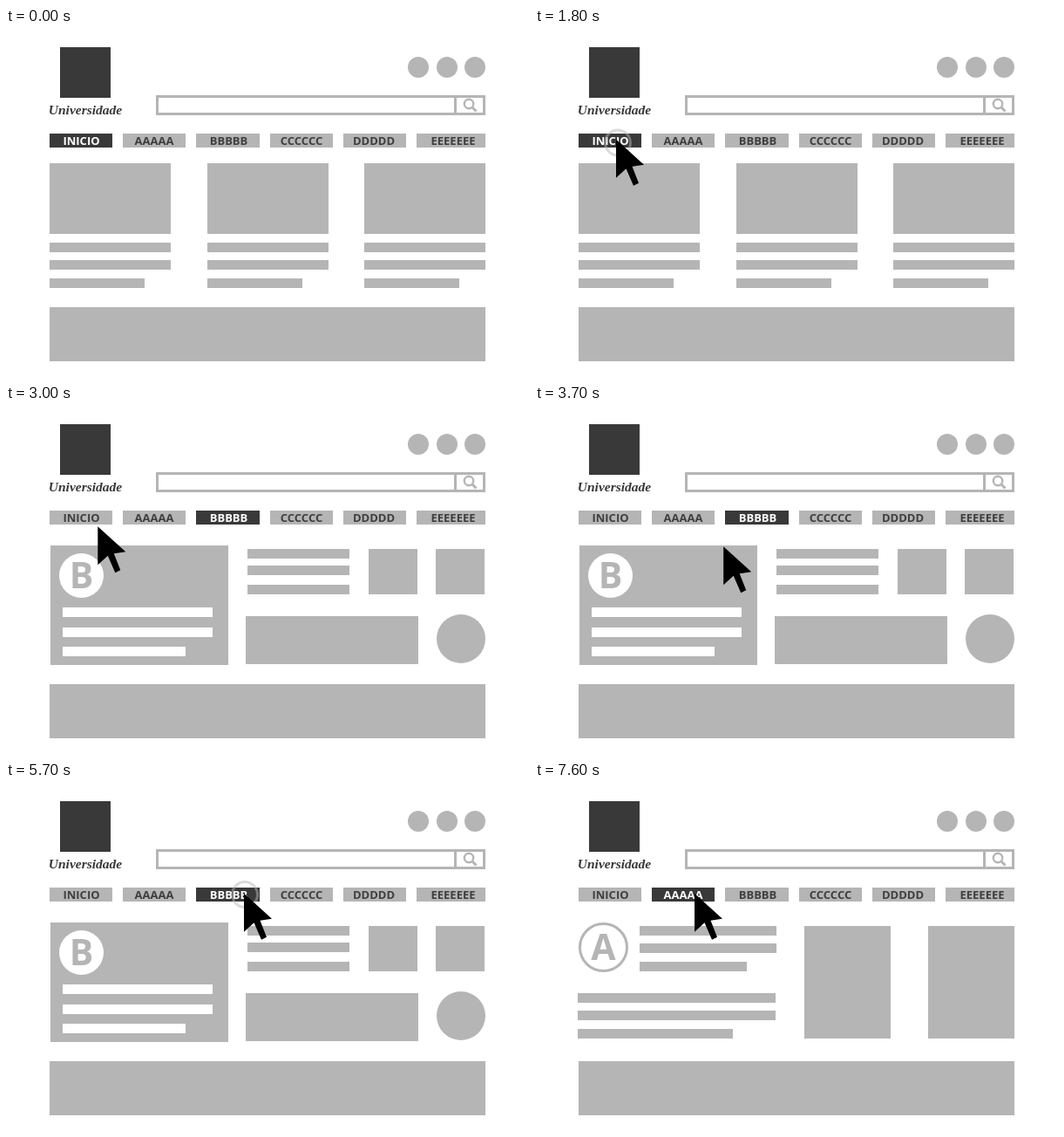
These frames come from a looping animation (600 by 400 pixels, 8000 ms). An HTML page:

```html
<!DOCTYPE html>
<html lang="pt">
<head>
<meta charset="utf-8">
<title>Universidade</title>
<style>
  html, body { margin: 0; width: 100%; height: 100%; overflow: hidden; background: #fff; }
  svg { display: block; width: 100%; height: 100%; fill: #b5b5b5; }
  text { font-family: "Open Sans", sans-serif; font-weight: 700; text-anchor: middle; }
  .outline { fill: none; stroke: #b5b5b5; stroke-width: 3; }
  .white { fill: #fff; }
  .brand { fill: #3a3939; }
  .brand text { font: italic 700 15.5px "Liberation Serif", serif; }
  .letter { font-size: 41px; }
  .tab text { font-size: 13px; fill: #403f3f; }
  .tab.active rect { fill: #3a3939; }
  .tab.active text { fill: #fff; }
  .page { display: none; }
  .page.active { display: inline; }
</style>
</head>
<body>
<svg viewBox="0 0 600 400">
  <g class="brand">
    <rect x="62" y="22" width="58" height="58"/>
    <text x="91" y="99">Universidade</text>
  </g>

  <circle cx="473" cy="45" r="12"/>
  <circle cx="506" cy="45" r="12"/>
  <circle cx="538" cy="45" r="12"/>

  <g class="outline">
    <path d="M173.5 78.5H548.5V98.5H173.5ZM515.5 78V99"/>
    <circle cx="531" cy="87" r="5.2" stroke-width="2.4"/>
    <path d="M535 91l4.5 4.5"/>
  </g>

  <g id="tabs"></g>

  <g class="page" id="home"></g>

  <g class="page" id="pageB">
    <path d="M51 161H255V298H51Z"/>
    <circle class="white" cx="86.5" cy="195.5" r="25.5"/>
    <text class="letter" x="86.5" y="209.5">B</text>
    <path class="white" d="M65 232h172v11h-172zM65 255h172v11h-172zM65 277h141v11h-141z"/>
    <path d="M277 165h117v11h-117zM277 184h117v11h-117zM277 206h117v11h-117z"/>
    <path d="M416 165h56v52h-56zM493 165h56v52h-56zM275 242h198v55h-198z"/>
    <circle cx="522" cy="268" r="28"/>
  </g>

  <g class="page" id="pageA">
    <circle class="outline" cx="78.5" cy="189.5" r="27"/>
    <text class="letter" x="78.5" y="203.5">A</text>
    <path d="M120 165h157v11h-157zM120 185h157v11h-157zM120 206h123v11h-123z"/>
    <path d="M49 242h227v11h-227zM49 262h227v11h-227zM49 283h178v11h-178z"/>
    <path d="M309 165h99v129h-99zM451 165h99v129h-99z"/>
  </g>

  <rect x="50" y="320" width="500" height="62"/>

  <circle id="ring" class="outline" stroke-width="2.5"/>
  <path id="cursor" fill="#000" d="M0 0L32 29 18.5 31 26 50 20 53 11.5 33.5 0 44Z"/>
</svg>

<script>
const LOOP = 8000, STEP = 100;
const $ = id => document.getElementById(id);

// label, left, right, text centre
const tabs = [
  ['INICIO', 50, 122, 86.5], ['AAAAA', 134, 206, 170], ['BBBBB', 218, 291, 255.5],
  ['CCCCCC', 303, 375, 339], ['DDDDD', 387, 459, 422], ['EEEEEEE', 471, 550, 513]
];
$('tabs').innerHTML = tabs.map(([label, left, right, mid]) =>
  `<g class="tab"><rect x="${left}" y="121" width="${right - left}" height="16"/>` +
  `<text x="${mid}" y="133.7">${label}</text></g>`).join('');
$('home').innerHTML = [50, 231, 411].map(x =>
  `<path d="M${x} 155h139v81h-139zM${x} 246h139v11h-139zM${x} 266h139v11h-139zM${x} 287h109v11h-109z"/>`).join('');

const progress = (t, start, end) => Math.min(1, Math.max(0, (t - start) / (end - start)));

// Point on a circular arc along a horizontal chord; positive sag bows downward.
function arc(x0, x1, y, sag, p) {
  const half = (x1 - x0) / 2, depth = Math.abs(sag);
  const radius = (half * half + depth * depth) / (2 * depth);
  const limit = Math.asin(half / radius), angle = limit * (2 * p - 1);
  return [
    x0 + half + radius * Math.sin(angle),
    y + Math.sign(sag) * radius * (Math.cos(angle) - Math.cos(limit))
  ];
}

function cursorAt(t) {
  if (t < 2900) {
    const p = progress(t, 100, 800);
    return [-32 + 125 * p, 172 - 44.3 * p];
  }
  if (t < 6800) return arc(93, 273, 127.7, 39, progress(t, 2900, 4100));
  return arc(273, 183, 127.7, -7, progress(t, 6800, 7600));
}

// The pointer shrinks around the moment of each click.
const clicks = [
  { time: 2200, ringStart: 1800, x: 95, y: 131.5 },
  { time: 6400, ringStart: 5700, x: 274, y: 129 }
];
const pressAt = t => Math.max(...clicks.map(c => Math.max(0, 1 - Math.abs(t - c.time) / 200)));

function draw(t) {
  const [x, y] = cursorAt(t);
  const scale = 1 - 0.22 * pressAt(t);
  $('cursor').setAttribute('transform',
    `translate(${x + 16} ${y + 26.5}) scale(${scale}) translate(-16 -26.5)`);

  const click = clicks.find(c => t >= c.ringStart && t < c.time - 100);
  $('ring').style.display = click ? 'inline' : 'none';
  if (click) {
    const p = progress(t, click.ringStart, click.time - 100);
    $('ring').setAttribute('cx', click.x);
    $('ring').setAttribute('cy', click.y);
    $('ring').setAttribute('r', 14.5 * (1 - p));
    $('ring').style.opacity = 0.5 + 0.3 * p;
  }

  const onB = t >= 2200 && t < 6400, onA = t >= 6400;
  $('home').classList.toggle('active', t < 2200);
  $('pageB').classList.toggle('active', onB);
  $('pageA').classList.toggle('active', onA);
  const lit = [t < 2200, onA, t >= 2200 && t < 6500];
  [...$('tabs').children].forEach((tab, i) => tab.classList.toggle('active', !!lit[i]));
}

const start = performance.now();
function tick() {
  const elapsed = performance.now() - start;
  draw(Math.floor((elapsed % LOOP) / STEP) * STEP);
  requestAnimationFrame(tick);
}
tick();
</script>
</body>
</html>
```
